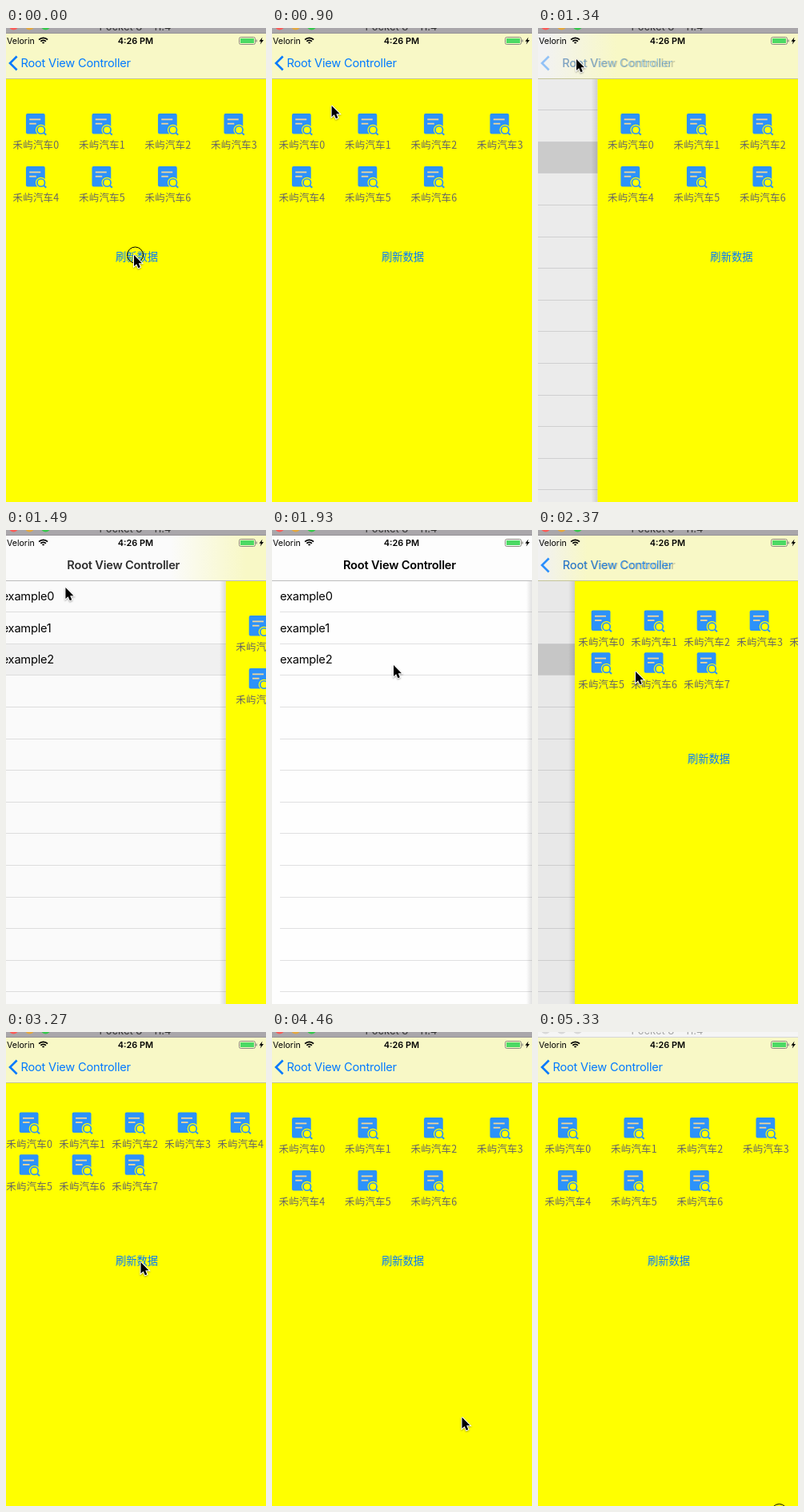
Recreate the animation shown at these times as an HTML page with a canvas. Size 325 px wide and 593 px high, loop 5.43 s.

```html
<!DOCTYPE html>
<html lang="zh">
<head>
<meta charset="utf-8">
<title>Navigation demo</title>
<style>
html, body { margin: 0; width: 100%; height: 100%; overflow: hidden; }
canvas { display: block; width: 325px; height: 593px; }
</style>
</head>
<body>
<canvas id="stage"></canvas>
<script>
const W = 325, H = 593, LOOP = 5430;
const LEFT = -4, SCREEN = 330, TOP = 7, NAV = 63, ROW = 39.6;
const POP = 1282, PUSH = 2160, REFRESH = 3870, BLUR = 5330;
const BLUE = '#007aff', YELLOW = '#ffff00', ICON = '#2c92fa';
const LATIN = 'Inter, Roboto, sans-serif';
const CJK = '"Noto Sans CJK SC", "Noto Sans CJK", sans-serif';

// The picture only changes at these moments.
const STEPS = [0, 150, 600, 750, 900, 1040, 1190, 1340, 1490, 1630, 1780, 1930,
  2220, 2370, 2520, 2670, 2820, 2970, 3120, 3270, 3720, 3870, 4020, 4170, 4310,
  4460, 4610, 4750, 4900, 5050, 5330];
// Pointer path: time, x, y
const PATH = [[0, 160, 284], [450, 160, 284], [1040, 48, 39], [1340, 48, 39],
  [1930, 152, 169], [2220, 122, 177], [2370, 122, 177], [3120, 167, 292],
  [3270, 168.5, 288], [3870, 168.5, 288], [4460, 237.5, 482], [4750, 279, 561],
  [4900, 291, 576], [5050, 300, 602], [LOOP, 300, 600]];
const PRESSES = [0, 1190, 3720, 5330];

const canvas = document.getElementById('stage');
const c = canvas.getContext('2d');
const ratio = window.devicePixelRatio || 1;
canvas.width = W * ratio;
canvas.height = H * ratio;

function rect(x, y, w, h, color) {
  c.fillStyle = color;
  c.fillRect(x, y, w, h);
}

function disc(x, y, r, color) {
  c.fillStyle = color;
  c.beginPath();
  c.arc(x, y, r, 0, 7);
  c.fill();
}

function poly(points, color) {
  c.fillStyle = color;
  c.beginPath();
  points.forEach(([x, y]) => c.lineTo(x, y));
  c.closePath();
  c.fill();
}

function line(points, color, width) {
  c.strokeStyle = color;
  c.lineWidth = width;
  c.beginPath();
  points.forEach(([x, y]) => c.lineTo(x, y));
  c.stroke();
}

function text(str, x, y, font, color, { align = 'left', spacing = 0, alpha = 1 } = {}) {
  c.font = font;
  c.fillStyle = color;
  c.textAlign = align;
  c.letterSpacing = spacing + 'px';
  c.globalAlpha = alpha;
  c.fillText(str, x, y);
  c.globalAlpha = 1;
}

// Critically damped slide; 0 = page covers the list, 1 = page is gone.
function slide(t) {
  const settle = ms => {
    const k = Math.max(0, ms) * 0.016;
    return 1 - (1 + k) * Math.exp(-k);
  };
  return t < PUSH ? settle(t - POP) : 1 - settle(t - PUSH);
}

function pointer(t) {
  const i = PATH.findIndex(p => p[0] > t);
  const [t0, x0, y0] = PATH[i - 1], [t1, x1, y1] = PATH[i];
  const f = (t - t0) / (t1 - t0);
  return [x0 + (x1 - x0) * f, y0 + (y1 - y0) * f];
}

function drawList(s, selected) {
  const x = LEFT - SCREEN * 0.3 * (1 - s);
  rect(0, TOP, W, H, '#fefefe');
  if (selected > 0.01) rect(0, 142, W, 40, `rgba(217,217,217,${selected})`);
  for (let i = 0; i < 13; i++) {
    const y = Math.floor(102.6 + ROW * i);
    rect(x + 14, y, SCREEN + 100, 1, '#e0e0e1');
    if (i < 3) text('example' + i, x + 14, y - 14, '14.6px ' + LATIN, '#000', { spacing: -0.2 });
  }
  rect(0, TOP, W, H, `rgba(0,0,0,${0.1 * (1 - s)})`);
}

function drawIcon(x, y) {
  c.save();
  c.translate(x, y);
  c.fillStyle = ICON;
  c.beginPath();
  c.roundRect(0.7, 0, 23.8, 25.5, 2);
  c.fill();
  rect(5, 6.5, 14, 1.8, '#f0d59a');
  rect(5, 11.8, 8.5, 1.8, '#f0d59a');
  disc(19.5, 20.5, 6.8, YELLOW);
  disc(19.5, 20.5, 5.6, ICON);
  disc(19.5, 20.5, 3.9, YELLOW);
  line([[23, 24], [26, 26.8]], ICON, 2);
  c.restore();
}

function drawPage(edge, columns, count) {
  const shadow = c.createLinearGradient(edge - 8, 0, edge, 0);
  shadow.addColorStop(0, 'rgba(0,0,0,0)');
  shadow.addColorStop(1, 'rgba(0,0,0,.13)');
  rect(edge - 8, NAV, 8, H, shadow);
  rect(edge, TOP, SCREEN, H, YELLOW);
  const w = SCREEN / columns, h = w * 0.8;
  for (let i = 0; i < count; i++) {
    const x = edge + w * (i % columns + 0.5);
    const y = 96.5 + h * (Math.floor(i / columns) + 0.5);
    drawIcon(x - 13, y - 22.5);
    text('禾屿汽车' + i, x + 0.2, y + 21.8, '12.5px ' + CJK, '#666',
      { align: 'center', spacing: 0.2 });
  }
  text('刷新数据', edge + 167.5, 291.3, '13.3px ' + CJK, BLUE, { align: 'center' });
}

function drawNav(t, s, edge) {
  const soft = Math.min(1, 4 * s, 8 * (1 - s));
  const g = Math.round(253 - 14 * (1 - s));
  const bar = c.createLinearGradient(edge - 70 * soft - 0.01, 0, edge + 25 * soft, 0);
  bar.addColorStop(0, `rgb(${g},${g},${g})`);
  bar.addColorStop(1, '#f8f8c6');
  rect(0, TOP, W, NAV - TOP, bar);
  rect(0, NAV, W, 1, s > 0.5 ? '#bcbcbc' : '#c4c49a');

  // The back label turns into the title, slightly behind the page.
  const q = slide(t - (t > PUSH && t < PUSH + 12 ? 0 : 12));
  const x = 18.5 + 70.5 * q;
  const back = (1 - q) ** (t < PUSH ? 5 : 1);
  const style = { spacing: -0.2 };
  text('Root View Controller', x, 49.3, '14.6px ' + LATIN, BLUE, { ...style, alpha: back });
  text('Root View Controller', x, 49.3, '600 14.6px ' + LATIN, '#000', { ...style, alpha: q });
  c.globalAlpha = back;
  line([[13.6, 35.5], [5, 44], [13.6, 52.5]], BLUE, 2.6);
  c.globalAlpha = 1;
}

function drawStatus() {
  text('Velorin', 1, 20, '10.6px ' + LATIN, '#000');
  text('4:26 PM', 162, 20, '600 10.9px ' + LATIN, '#000', { align: 'center' });
  c.strokeStyle = '#000';
  c.lineWidth = 1.8;
  for (const r of [1.5, 4.6, 7.7]) {
    c.beginPath();
    c.arc(46.6, 20, r, -Math.PI * 0.75, -Math.PI * 0.25);
    c.stroke();
  }
  c.strokeStyle = '#8a8a80';
  c.lineWidth = 1;
  c.beginPath();
  c.roundRect(291.5, 11.5, 20, 9, 2);
  c.stroke();
  rect(293, 13, 17, 6, '#4cd964');
  rect(312.5, 14.5, 1.3, 3, '#8a8a80');
  poly([[320.5, 11.5], [316.5, 16.8], [318.8, 16.8], [317.8, 20.5], [322, 15], [319.6, 15]], '#000');
}

function drawWindowBar(active) {
  rect(0, 0, W, TOP, active ? '#a9a6aa' : '#f5f5f5');
  rect(0, TOP - 1, W, 1, active ? '#959296' : '#d6d6d6');
  const lights = active ? ['#fc5b57', '#e5a83c', '#34c84a'] : Array(3).fill('#d8d8d8');
  lights.forEach((color, i) => disc(9.5 + 20 * i, -3.5, 6, color));
  text('Pocket 8 - 11.4', 161.5, 2.6, '13px ' + LATIN, active ? '#333' : '#a5a5a5',
    { align: 'center' });
}

function drawPointer(t) {
  const [x, y] = pointer(t);
  if (PRESSES.includes(t)) {
    c.strokeStyle = '#000';
    c.lineWidth = 1;
    c.beginPath();
    c.arc(x + 1.5, y, 10, 0, 7);
    c.stroke();
  }
  const arrow = [[0, 0], [0, 14], [3.2, 11.2], [5.4, 16.2], [7.8, 15.2], [5.7, 10.3], [10, 10.2]]
    .map(([dx, dy]) => [x + dx, y + dy]);
  c.shadowColor = 'rgba(0,0,0,.35)';
  c.shadowBlur = 2 * ratio;
  c.shadowOffsetY = ratio;
  line([...arrow, arrow[0]], '#fff', 2);
  c.shadowColor = 'transparent';
  poly(arrow, '#000');
}

function draw(t) {
  const s = slide(t), edge = LEFT + SCREEN * s;
  const wide = t >= PUSH && t < REFRESH;
  c.setTransform(ratio, 0, 0, ratio, 0, 0);
  drawList(s, t < PUSH ? 1 - s * s : 1);
  drawPage(edge, wide ? 5 : 4, wide ? 8 : 7);
  drawNav(t, s, edge);
  drawStatus();
  drawWindowBar(t < BLUR);
  drawPointer(t);
}

const start = performance.now();
function tick() {
  const now = (performance.now() - start) % LOOP;
  draw(STEPS.findLast(step => step <= now));
  requestAnimationFrame(tick);
}
tick();
</script>
</body>
</html>
```
